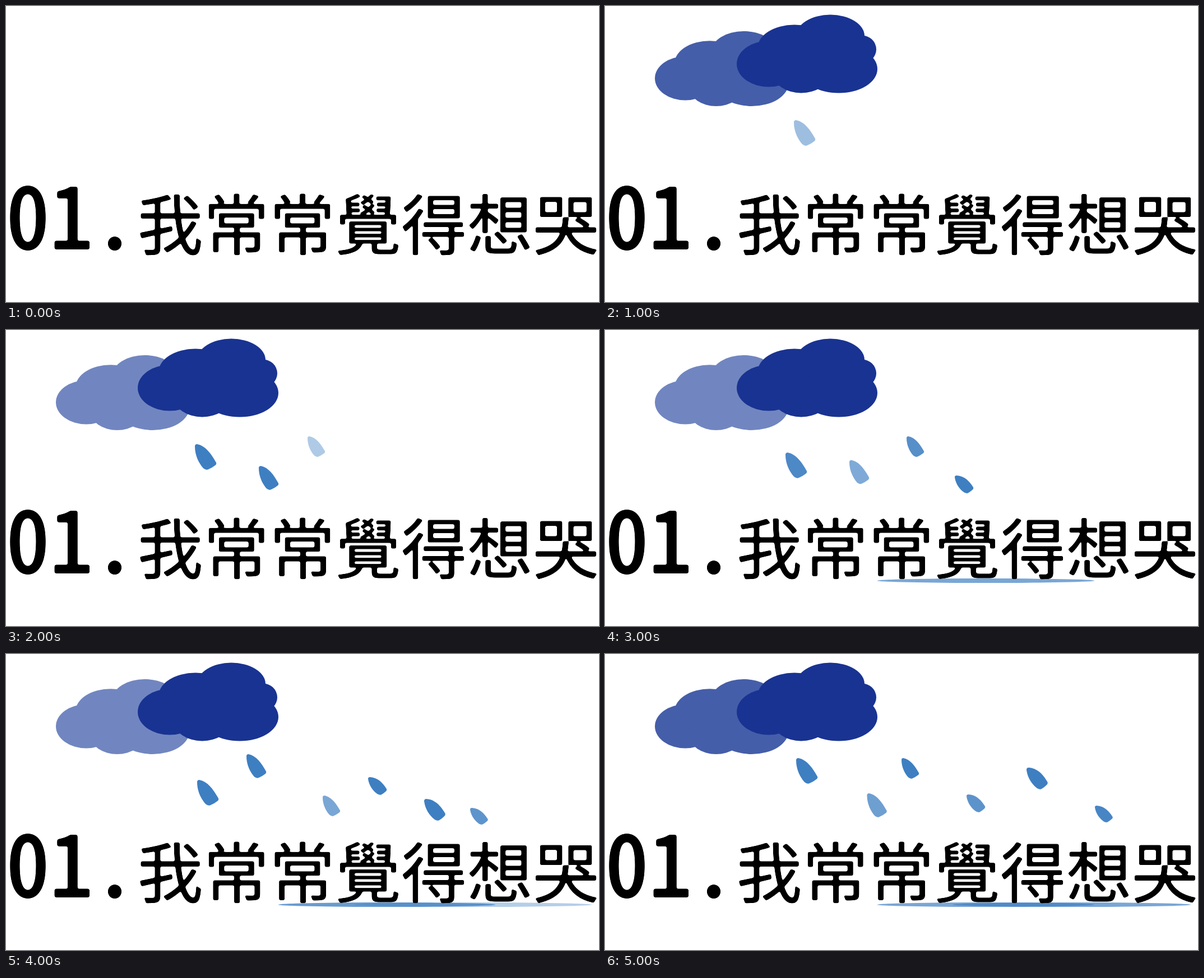
An HTML page that plays this animation: 1058 by 529 pixels, repeating every 6 s.

```html
<!DOCTYPE html>
<html lang="zh-Hant">
<head>
<meta charset="utf-8">
<title>01.我常常覺得想哭</title>
<style>
  html, body { margin: 0; width: 100%; height: 100%; overflow: hidden; background: #fff; }
  svg { display: block; width: 100%; height: 100%; }
  text {
    font-family: "Noto Sans CJK TC", "Noto Sans CJK JP", "Noto Sans CJK", sans-serif;
    font-weight: 400;
    stroke: #000;
    stroke-linejoin: round;
  }
  .number {
    font-family: "Noto Sans Mono CJK TC", "Noto Sans CJK TC", "Noto Sans CJK JP", monospace;
    font-feature-settings: "hwid";
    font-size: 151px;
    stroke-width: 4px;
    text-anchor: middle;
  }
  .title { font-size: 117px; letter-spacing: .65px; stroke-width: 1px; }
</style>
</head>
<body>
<svg viewBox="0 0 1058 529">
  <defs>
    <!-- Softens the corners of the lettering, then sharpens the edge again -->
    <filter id="rounded" filterUnits="userSpaceOnUse" x="0" y="0" width="1058" height="529">
      <feGaussianBlur stdDeviation="1.8"/>
      <feComponentTransfer><feFuncA type="linear" slope="5" intercept="-2"/></feComponentTransfer>
    </filter>
    <g id="cloud">
      <ellipse cx="292" cy="103" rx="57" ry="41"/>
      <ellipse cx="338" cy="75" rx="66" ry="42"/>
      <ellipse cx="402" cy="53" rx="61" ry="38"/>
      <ellipse cx="458" cy="77" rx="26" ry="25"/>
      <ellipse cx="417" cy="112" rx="69" ry="43"/>
      <ellipse cx="350" cy="120" rx="50" ry="35"/>
    </g>
  </defs>

  <g id="clouds">
    <g id="backCloud"><use href="#cloud" transform="translate(89 45) scale(.95 .957) translate(-235 -15)"/></g>
    <use href="#cloud" y=".5" fill="#193392"/>
  </g>
  <g id="water" fill="#3e7fc2">
    <ellipse id="puddle1" cx="679.5" cy="448" rx="194" ry="4"/>
    <ellipse id="puddle2" cx="832.5" cy="448" rx="212.5" ry="4"/>
  </g>
  <g filter="url(#rounded)">
    <text class="number" x="39 116.5 194" y="433">01.</text>
    <text class="title" x="234.6" y="435.3">我常常覺得想哭</text>
  </g>
</svg>

<script>
const LOOP = 6000;
const byId = id => document.getElementById(id);

const STEEP = { w: 38, h: 46, d: "M0 4Q0 0 4 0C19 3 29 17 38 33Q39 36 36 38Q31 42 24 45Q20 47 15 43C7 34 0 20 0 4Z" };
const SLANTED = { w: 38, h: 39, d: "M0 4Q0 0 4 0C20 1 30 13 37 25Q39 28 36 31Q32 35 27 38Q24 40 19 37C10 30 2 19 0 4Z" };

const drops = [
  [STEEP, 38, 46], [STEEP, 35, 43], [STEEP, 31, 37],
  [SLANTED, 33.5, 32], [SLANTED, 38, 39], [SLANTED, 32, 30]
].map(([shape, w, h]) => {
  const path = document.createElementNS("http://www.w3.org/2000/svg", "path");
  path.setAttribute("d", shape.d);
  byId("water").append(path);
  return { path, scale: `scale(${w / shape.w} ${h / shape.h})` };
});

// Top-left corner of each drop
const FIRST = [[337, 204], [451, 243], [538, 190], [624, 260]];
const SECOND = [[322, 219], [436, 232.5], [538, 190], [624, 260]];
const HIGH = [[341, 186], [467.5, 249], [529, 186], [645, 251], [752, 203], [874, 271]];
const LOW = [[341, 225], [429, 179], [565, 253], [646, 220], [746, 259], [828, 275]];

const MID = "#5a71b3", DEEP = "#455ea9", PALE = "#7186c0";

// Cloud colour, puddle and drop opacities held from each start time on
const steps = [
  { at: 0,    cloud: null, puddles: [0, 0],     places: FIRST,  rain: [] },
  { at: 500,  cloud: MID,  puddles: [0, 0],     places: FIRST,  rain: [] },
  { at: 1000, cloud: DEEP, puddles: [0, 0],     places: FIRST,  rain: [.5] },
  { at: 1500, cloud: DEEP, puddles: [0, 0],     places: FIRST,  rain: [1, .48] },
  { at: 2000, cloud: PALE, puddles: [0, 0],     places: FIRST,  rain: [1, 1, .41] },
  { at: 2500, cloud: PALE, puddles: [.38, 0],   places: FIRST,  rain: [1, 1, 1, .5] },
  { at: 3000, cloud: PALE, puddles: [.69, 0],   places: SECOND, rain: [.92, .66, .87, 1] },
  { at: 3500, cloud: PALE, puddles: [.81, 0],   places: HIGH,   rain: [1, .75, 1, .84, .5] },
  { at: 4000, cloud: PALE, puddles: [.78, .38], places: LOW,    rain: [1, 1, .69, 1, 1, .83] },
  { at: 4500, cloud: PALE, puddles: [.69, .69], places: HIGH,   rain: [1, .75, 1, .84, 1, .83] },
  { at: 5000, cloud: DEEP, puddles: [.69, .69], places: HIGH,   rain: [1, .75, 1, .84, 1, .95] }
];

function show({ cloud, puddles, places, rain }) {
  byId("clouds").style.visibility = cloud ? "visible" : "hidden";
  byId("backCloud").style.fill = cloud;
  puddles.forEach((opacity, i) => byId(`puddle${i + 1}`).style.opacity = opacity);
  drops.forEach(({ path, scale }, i) => {
    path.style.opacity = rain[i] || 0;
    if (places[i]) path.setAttribute("transform", `translate(${places[i]}) ${scale}`);
  });
}

let current;
function tick() {
  const time = performance.now() % LOOP;
  const step = steps.findLast(({ at }) => at <= time);
  if (step !== current) show(current = step);
  requestAnimationFrame(tick);
}
tick();
</script>
</body>
</html>
```
